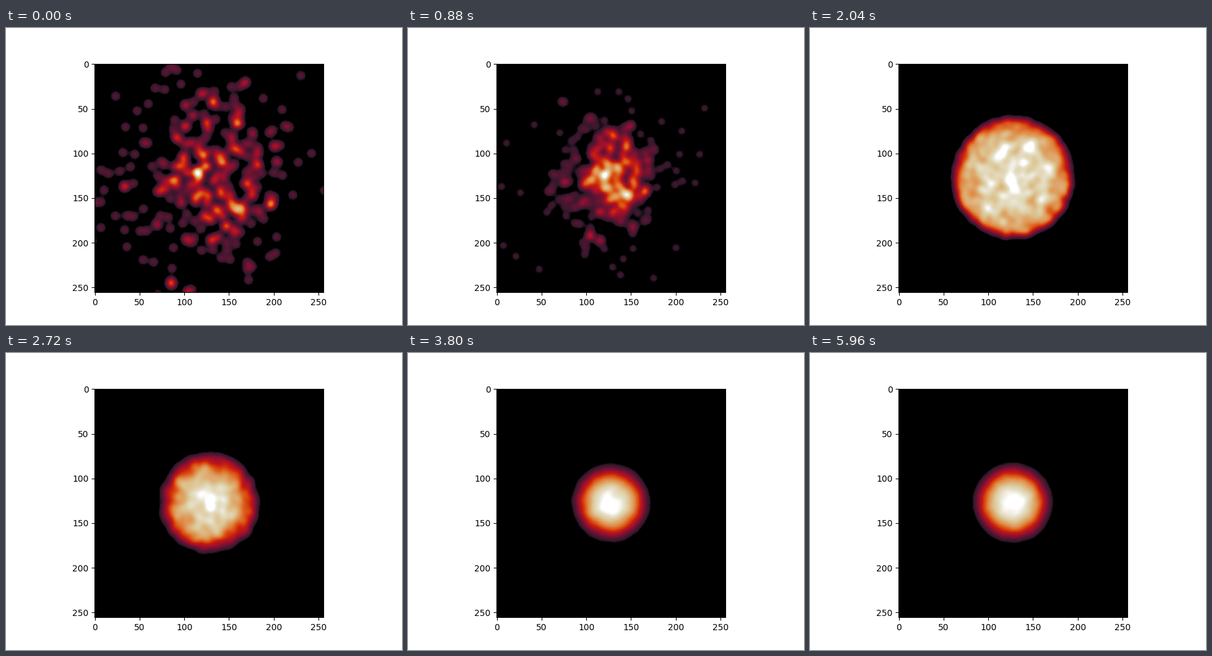
Recreate the animation shown at these times as a matplotlib script. Size 640x480 px, loop 6 s.

```python
import numpy as np
import matplotlib.pyplot as plt
from matplotlib.animation import FuncAnimation
from matplotlib.colors import LinearSegmentedColormap

SIZE, PAD, BLUR = 256, 16, 3.8
CENTER = (SIZE - 1) / 2
FRAMES, STEP = 150, 40
PX = 369.6 / SIZE          # screen pixels per grid cell

rng = np.random.default_rng(12)

heat = LinearSegmentedColormap.from_list("heat", [
    (0, "#000000"), (.03, "#000000"), (.06, "#33192b"), (.13, "#5a1533"),
    (.25, "#a0102d"), (.34, "#c41a14"), (.42, "#d9460a"), (.55, "#e08a45"),
    (.72, "#ddc492"), (.85, "#e6e2cc"), (.93, "#ffffff"), (1, "#ffffff")], N=64)

# Falling stars: a dense core, a wide halo and the brightest clumps
CORE, HALO = 220, 110
clumps = np.array([(87, 130), (117, 146), (125, 65), (115, 121), (157, 95),
                   (182, 113), (197, 157), (146, 182), (130, 197), (85, 244),
                   (158, 67), (142, 110), (33, 137), (91, 82)]) - CENTER
fall = np.vstack([rng.normal(0, 44, (CORE, 2)),
                  rng.normal(0, 95, (HALO, 2)), clumps])
fall_w = np.ones(len(fall))
fall_w[-len(clumps):] = 2.6

# Settled cloud: every star swings in and out while it drifts around
STARS, COARSE = 30000, 6000
phase = rng.uniform(0, 2, STARS)
swing = rng.normal(.001, .00015, STARS)
theta = rng.uniform(0, 2 * np.pi, STARS)
spin = rng.normal(0, .0005, STARS)

# Turning points of the cloud's breathing: time in ms, radius in pixels
TIMES = [900, 1440, 2160, 3360, 4300, 5300, 6000]
RADII = [118, 43, 99, 57, 77, 61, 67]

edges = np.arange(-PAD - .5, SIZE + PAD - .4, .5)
mids = (edges[:-1] + edges[1:]) / 2
kernel = np.exp(-((np.arange(SIZE)[:, None] - mids) / BLUR) ** 2 / 2)


def smooth(t, a, b):
    f = np.clip((t - a) / (b - a), 0, 1)
    return (1 - np.cos(np.pi * f)) / 2


def density(x, y, w):
    grid = np.histogram2d(y + CENTER, x + CENTER, bins=(edges, edges), weights=w)[0]
    img = kernel @ grid @ kernel.T
    return img / img.max()


def collapse(t):
    k = t / 480
    x, y = (fall * (1 - .201 * k - .024 * k * k)).T
    return density(x, y, fall_w)


def cloud(t):
    radius = RADII[0] + sum(
        (RADII[i + 1] - RADII[i]) * smooth(t, TIMES[i], TIMES[i + 1])
        for i in range(len(TIMES) - 1))
    power = np.clip(1.5 - (radius - 64) / 22, .3, 1.5)   # wide clouds are flatter
    u = np.abs((phase + swing * t) % 2 - 1)
    r = radius / PX * np.sqrt(1 - (1 - u) ** (1 / (power + 1)))
    ang = theta + spin * t
    w = np.ones(STARS)
    w[COARSE:] = smooth(t, 2700, 4200)   # grain fades as the cloud settles
    return density(r * np.cos(ang), r * np.sin(ang), w)


def field(t):
    mix = smooth(t, 1000, 1380)
    if mix == 0:
        return collapse(t)
    if mix == 1:
        return cloud(t)
    img = (1 - mix) * collapse(t) + mix * cloud(t)
    return img / img.max()


fig, ax = plt.subplots(figsize=(6.4, 4.8), dpi=100)
image = ax.imshow(field(0), cmap=heat, vmin=0, vmax=1)


def update(n):
    image.set_data(field(n * STEP))
    return image,


anim = FuncAnimation(fig, update, frames=FRAMES, interval=STEP, repeat=True)
plt.show()
```
